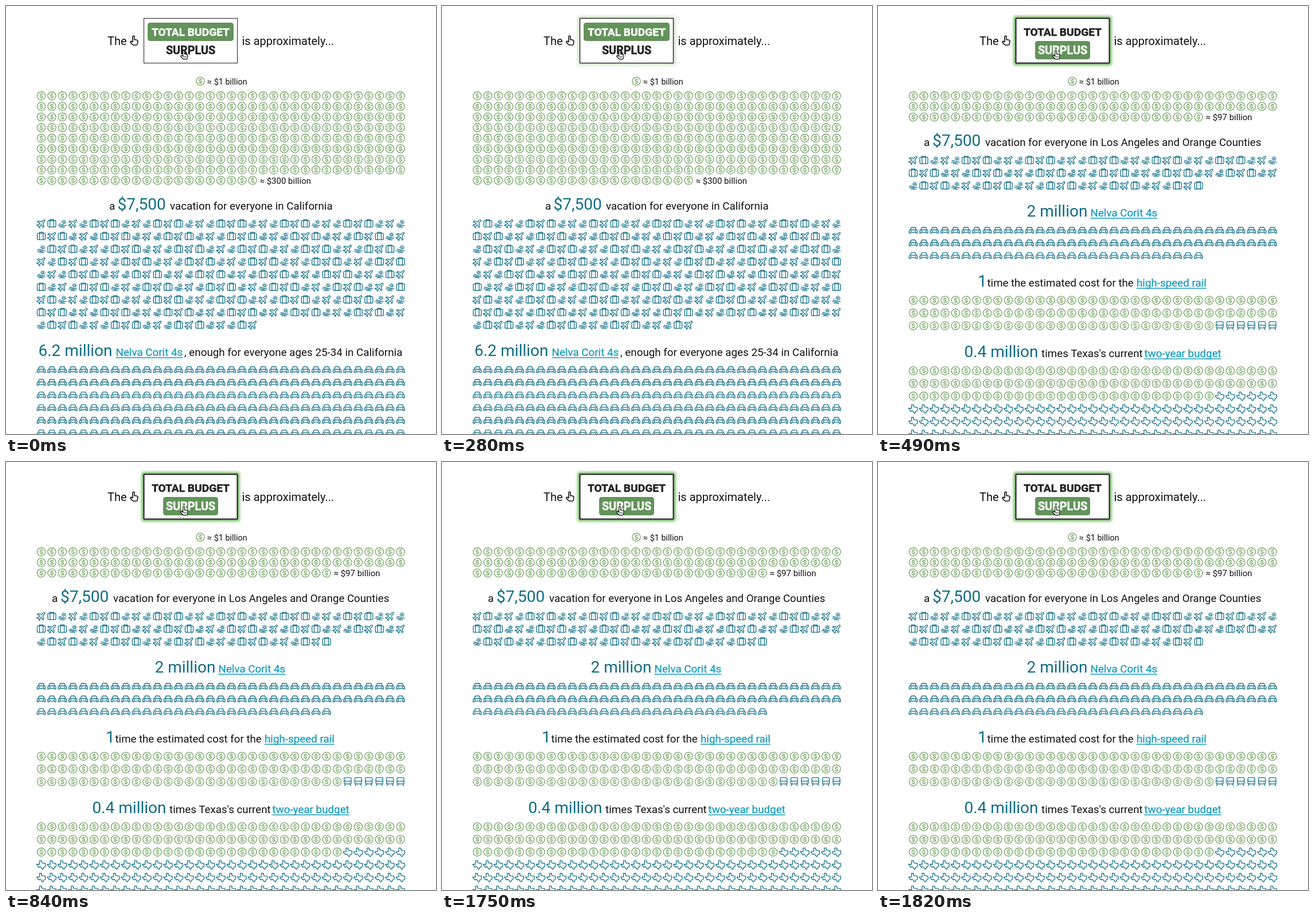
An HTML page that plays this animation: 750 by 746 pixels, repeating every 2.1 s.

```html
<!DOCTYPE html>
<html lang="en">
<head>
<meta charset="utf-8">
<title>Budget comparison</title>
<style>
  html, body { margin: 0; width: 100%; height: 100%; overflow: hidden; background: #fff; }
  svg { display: block; width: 750px; height: 746px; }
  text { font-family: Roboto, "Open Sans", sans-serif; fill: #111; white-space: pre; }
  .big { fill: #0f6c87; }
  .link { fill: #159abb; stroke: #159abb; stroke-width: .25px; }
  .rule { stroke: #159abb; stroke-width: 1.4px; }
  .option { font-weight: 700; fill: #222; stroke: #222; stroke-width: .45px; text-anchor: middle; }
  .chosen { fill: #fff; stroke: #fff; }
  .pill { fill: #63935a; }
  .icon { fill: none; stroke: #1a748e; stroke-width: 1.35px; stroke-linejoin: round; stroke-linecap: round; }
  .money { stroke: #78a568; }
</style>
</head>
<body>
<svg viewBox="0 0 750 746">
  <defs>
    <filter id="blur" x="-20%" y="-30%" width="140%" height="160%">
      <feGaussianBlur stdDeviation="2.6"/>
    </filter>
    <g id="coin" class="icon money">
      <circle r="7.1"/>
      <path d="M2.3-2.1C1.8-3.4-2.3-3.5-2.3-1.4C-2.3.7 2.4-.7 2.4 1.5C2.4 3.5-1.9 3.3-2.4 2M0-4.4V-3M0 3V4.4"/>
    </g>
    <g id="plane" class="icon">
      <path transform="rotate(45)" d="M0-8.6C1.2-8.6 1.5-7 1.5-5.5V-2.5L7 .8V2.9L1.5 1.3V4.8L3.2 6.3V7.8L0 6.9L-3.2 7.8V6.3L-1.5 4.8V1.3L-7 2.9V.8L-1.5-2.5V-5.5C-1.5-7-1.2-8.6 0-8.6Z"/>
    </g>
    <g id="bag" class="icon">
      <rect x="-7" y="-5" width="14" height="11.3" rx="2"/>
      <path d="M-3.2 6.3V-6.6H3.2V6.3"/>
    </g>
    <g id="beach" class="icon">
      <circle cx="2.5" cy="-2.2" r="1.9"/>
      <path d="M2.5-6.2V-5.9M-1.5-2.2H-1.2M6.2-2.2H6.5M-.3-5L-.1-4.8M5.3-5L5.1-4.8M5.3.6L5.1.4"/>
      <path d="M-6.2 1.3Q-4 .4-2 1.5T2.2 2.2M-7 4Q-4.8 2.9-2.4 4T2.2 4T6.8 3.8M-4.5 6.5Q-2.4 5.5 0 6.4T4 6.2"/>
    </g>
    <g id="car" class="icon">
      <path d="M-5.2-.8L-3.9-4.3Q-3.5-5.3-2.5-5.3H2.5Q3.5-5.3 3.9-4.3L5.2-.8M-5-.8H5Q7.1-.6 7.1 1.8V4.9H4.6V3.5H-4.6V4.9H-7.1V1.8Q-7.1-.6-5-.8ZM-4.7 1.4H-3.2M3.2 1.4H4.7"/>
    </g>
    <g id="train" class="icon">
      <rect x="-6" y="-7" width="12" height="11" rx="2"/>
      <path d="M-6-.8H6M-3.3 1.7H-2.9M2.9 1.7H3.3M-3.8 4L-5.5 7M3.8 4L5.5 7"/>
    </g>
    <path id="state" class="icon" d="M-3-7H.6V-3.7L3-2.7L7-2.4L7.5 1.4L7.3 3L4.2 5L3.3 7.8L1.3 7.2L-.8 3.9L-2.4 3.2L-3.9 4.5L-5.4 3L-8-.7H-3Z"/>
    <path id="hand" stroke-linejoin="round" d="M-2.5 1.6V-6.5a1.5 1.5 0 0 1 3 0V-1.4L4.6-.7Q6.6-.2 6.4 1.9L5.7 6.4Q5.4 8 4 8H-1.2Q-2.2 8-2.9 7.2L-6.8 2.9Q-6.6 1.2-5 1.2L-2.5 2.7Z"/>
  </defs>

  <rect id="glow" x="240" y="21" width="164" height="79" fill="none" stroke="#5fae4c" stroke-width="6" filter="url(#blur)"/>
  <rect x="240.5" y="21.5" width="163" height="78" fill="#fff" stroke="#222"/>
  <rect id="frame" x="240.5" y="21.5" width="163" height="78" rx="1" fill="none" stroke="#1c1c1c" stroke-width="2"/>
  <g id="shared"></g>
  <use href="#hand" x="223.5" y="60" fill="none" stroke="#111" stroke-width="1.6"/>
  <g id="total"></g>
  <g id="surplus"></g>
  <g transform="translate(311 85) scale(.94)">
    <use href="#hand" fill="#fff" stroke="#111" stroke-width="1.3"/>
    <path d="M-.9 2.5V5.3M1.2 2.5V5.3M3.3 2.5V5.3" stroke="#111" stroke-width=".9"/>
  </g>
</svg>
<script>
const LOOP = 2100, SWITCH = 490;
const COLS = 35, LEFT = 61.5, STEP = 18.43, ROW = 22.08;
const BODY = 18.8, BIG = 28;
const TRIP = ["plane", "bag", "beach", "plane", "beach", "bag"];
// Hover strength of the option box from each time on.
const HOVER = [[0, 0], [280, .35], [350, .75], [420, 1]];

const byId = id => document.getElementById(id);

function add(parent, tag, attrs, text = "") {
  const el = document.createElementNS("http://www.w3.org/2000/svg", tag);
  for (const key in attrs) el.setAttribute(key, attrs[key]);
  el.textContent = text;
  return parent.appendChild(el);
}

function write(parent, x, y, text, size = BODY, cls = "") {
  return add(parent, "text", { x, y, "font-size": size, class: cls }, text);
}

function link(parent, x, y, text) {
  const width = write(parent, x, y, text, BODY, "link").getComputedTextLength();
  add(parent, "line", { x1: x, x2: x + width, y1: y + 3, y2: y + 3, class: "rule" });
}

// Fills a grid with count icons; pick(i) names the icon in cell i.
function grid(parent, top, count, pick, row = ROW) {
  for (let i = 0; i < count; i++) {
    const x = LEFT + (i % COLS) * STEP;
    const y = top + Math.floor(i / COLS) * row;
    add(parent, "use", { href: "#" + pick(i), x: x.toFixed(2), y: y.toFixed(2) });
  }
}

const coins = () => "coin";
const cars = () => "car";
const trip = i => TRIP[i % TRIP.length];
const coinsThen = (n, other) => i => i < n ? "coin" : other;

function options(parent, chosen) {
  const pill = chosen ? [274, 61, 96] : [247, 29, 150];
  add(parent, "rect", { x: pill[0], y: pill[1], width: pill[2], height: 32, rx: 4.5, class: "pill" });
  write(parent, 322, 52, "TOTAL BUDGET", 19.2, chosen ? "option" : "option chosen");
  write(parent, 322, 84, "SURPLUS", 19.8, chosen ? "option chosen" : "option");
}

function buildShared(g) {
  write(g, 177, 68, "The", 20);
  write(g, 411.5, 68, "is approximately...", 20);
  add(g, "use", { href: "#coin", x: 339, y: 131 });
  write(g, 351, 136.5, "≈ $1 billion", 14.4);
}

function buildTotal(g) {
  options(g, 0);
  grid(g, 156.6, 301, coins, STEP);
  write(g, 442.5, 309.5, "≈ $300 billion", 15);

  write(g, 180, 354.5, "a");
  write(g, 194.5, 354.5, "$7,500", BIG, "big");
  write(g, 286, 354.5, "vacation for everyone in California");
  grid(g, 379, 301, trip);

  write(g, 56.5, 610, "6.2 million", BIG, "big");
  link(g, 191.5, 610, "Nelva Corit 4s");
  write(g, 311, 610, ", enough for everyone ages 25-34 in California");
  grid(g, 634, 6 * COLS, cars);
}

function buildSurplus(g) {
  options(g, 1);
  grid(g, 156.6, 98, coins, STEP);
  write(g, 571.5, 199, "≈ $97 billion", 15);

  write(g, 80, 244, "a");
  write(g, 95, 244, "$7,500", BIG, "big");
  write(g, 187, 244, "vacation for everyone in Los Angeles and Orange Counties", 18.65);
  grid(g, 268.5, 98, trip);

  write(g, 259.5, 367, "2 million", BIG, "big");
  link(g, 370.5, 367, "Nelva Corit 4s");
  grid(g, 391, 98, cars);

  write(g, 174, 489, "1", BIG, "big");
  write(g, 190.5, 489, "time the estimated cost for the", 18.65);
  link(g, 451, 489, "high-speed rail");
  grid(g, 513, 105, coinsThen(99, "train"));

  write(g, 150.5, 612, "0.4 million", BIG, "big");
  write(g, 285, 612, "times Texas's current");
  link(g, 464.5, 612, "two-year budget");
  grid(g, 635.7, 6 * COLS, coinsThen(99, "state"));
}

buildShared(byId("shared"));
buildTotal(byId("total"));
buildSurplus(byId("surplus"));

const start = performance.now();

function draw() {
  const t = (performance.now() - start) % LOOP;
  const hover = HOVER.filter(([at]) => t >= at).pop()[1];
  byId("glow").style.opacity = hover;
  byId("frame").style.opacity = hover;
  byId("total").style.display = t < SWITCH ? "" : "none";
  byId("surplus").style.display = t < SWITCH ? "none" : "";
  requestAnimationFrame(draw);
}
draw();
</script>
</body>
</html>
```
